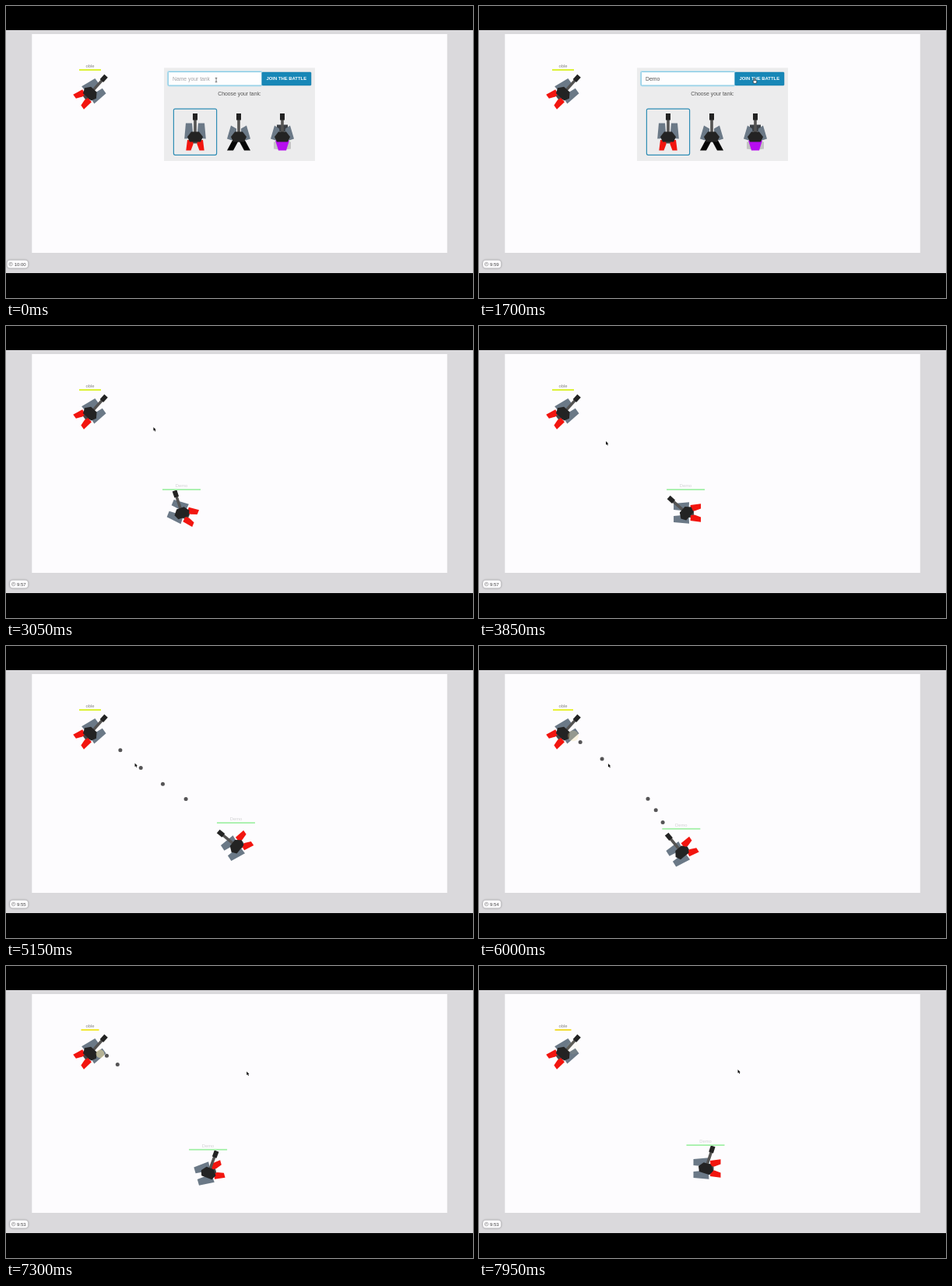
An HTML page with a canvas that plays this animation: 600 px wide and 375 px high, repeating every 8 s.

```html
<!DOCTYPE html>
<html lang="en">
<head>
<meta charset="utf-8">
<title>Tank battle</title>
<style>
html, body { margin: 0; width: 100%; height: 100%; overflow: hidden; background: #000; }
canvas { display: block; width: 600px; height: 375px; }
</style>
</head>
<body>
<canvas id="stage"></canvas>
<script>
const LOOP = 8000, SPAWN = 2000;
const canvas = document.getElementById('stage');
const ctx = canvas.getContext('2d');
const dpr = window.devicePixelRatio || 1;
canvas.width = 600 * dpr;
canvas.height = 375 * dpr;

const FONT = '"Liberation Sans", Arial, sans-serif';
const ARMOUR = '#6b7987', DARK = '#232323', HULL = '#454545';
const RIVAL_NAME = 'oble', PLAYER_NAME = 'Demo';
const RIVAL = { x: 108.5, y: 112, body: 54, gun: 42 };

// Waypoints, joined at steady speed
const ROUTE = [
  { t: 3060, x: 226, y: 240, body: -68 },
  { t: 3850, x: 266, y: 240, body: -90 },
  { t: 4800, x: 313, y: 248, body: -105 },
  { t: 5150, x: 296, y: 257, body: -124 },
  { t: 6700, x: 231, y: 271, body: -121 },
  { t: 7950, x: 291.5, y: 260, body: -90 }
];
// Pointer stops, each reached with an ease-out
const STOPS = [
  { t: 900, x: 270, y: 95 },
  { t: 1600, x: 354, y: 93.5 },
  { t: 2280, x: 354, y: 93.5 },
  { t: 3050, x: 190, y: 130 },
  { t: 3450, x: 116, y: 120 },
  { t: 3850, x: 163, y: 148 },
  { t: 6700, x: 166, y: 151 },
  { t: 7950, x: 332.5, y: 133 }
];
const BURSTS = [{ start: 3870, count: 4, gap: 235 }, { start: 5350, count: 3, gap: 215 }];
const SHOT_SPEED = 0.105, MUZZLE = 26, HIT_X = 124, BLAST = 420;

const clamp = (v) => Math.max(0, Math.min(1, v));
const rad = (deg) => deg * Math.PI / 180;
const linear = (k) => k;
const easeOut = (k) => 1 - (1 - k) ** 3;

function along(points, t, ease) {
  const next = points.findIndex((p) => t <= p.t);
  if (next < 1) return points.at(next);
  const a = points[next - 1], b = points[next];
  const k = ease((t - a.t) / (b.t - a.t));
  const mix = {};
  for (const key in a) mix[key] = a[key] + (b[key] - a[key]) * k;
  return mix;
}

const pointerAt = (t) => along(STOPS, t, easeOut);

// The gun always follows the pointer
function playerAt(t) {
  const p = along(ROUTE, t, linear), aim = pointerAt(t);
  const gun = Math.atan2(aim.x - p.x, p.y - aim.y) * 180 / Math.PI;
  return { ...p, gun };
}

function shoot(start) {
  const p = playerAt(start), a = rad(p.gun);
  const dx = Math.sin(a), dy = -Math.cos(a);
  const x = p.x + dx * MUZZLE, y = p.y + dy * MUZZLE;
  const len = (HIT_X - x) / dx;
  return { start, x, y, dx, dy, hit: start + len / SHOT_SPEED, hitY: y + dy * len };
}

const bullets = BURSTS.flatMap(({ start, count, gap }) =>
  Array.from({ length: count }, (_, i) => shoot(start + i * gap)));

function rect(x, y, w, h, fill) {
  ctx.fillStyle = fill;
  ctx.fillRect(x, y, w, h);
}

function poly(fill, ...points) {
  ctx.beginPath();
  for (let i = 0; i < points.length; i += 2) ctx.lineTo(points[i], points[i + 1]);
  ctx.closePath();
  ctx.fillStyle = fill;
  ctx.fill();
}

function mirrored(fill, ...points) {
  poly(fill, ...points);
  poly(fill, ...points.map((v, i) => i % 2 ? v : -v));
}

function box(x, y, w, h, r, fill, stroke, line) {
  ctx.beginPath();
  ctx.roundRect(x, y, w, h, r);
  if (fill) { ctx.fillStyle = fill; ctx.fill(); }
  if (stroke) { ctx.strokeStyle = stroke; ctx.lineWidth = line; ctx.stroke(); }
}

function dot(x, y, r, fill) {
  ctx.beginPath();
  ctx.arc(x, y, r, 0, 7);
  ctx.fillStyle = fill;
  ctx.fill();
}

function text(str, x, y, size, color, align = 'left', weight = '') {
  ctx.font = `${weight} ${size}px ${FONT}`;
  ctx.textAlign = align;
  ctx.fillStyle = color;
  ctx.fillText(str, x, y);
}

function placed(x, y, deg, paint) {
  ctx.save();
  ctx.translate(x, y);
  ctx.rotate(rad(deg));
  paint();
  ctx.restore();
}

// Hulls point up, with the turret pivot at the origin
function redHull() {
  rect(-6, 2, 12, 8, HULL);
  mirrored(ARMOUR, -12, -16, -4, -16, -3, -5, -6, 3.5, -13.8, 4);
  mirrored('#f2150f', -3, 6, -10, 5.5, -11.7, 19, -5.5, 19, -2.5, 11);
}

function blackHull() {
  rect(-5, 0, 10, 8, HULL);
  mirrored(ARMOUR, -10, -13, -3, -9, -3, 0, -9, 6, -15, 4);
  mirrored('#050505', 0, 6, -8, 6, -15, 19, -7, 19);
}

function purpleHull() {
  rect(-7, -14, 14, 9, '#3b3f44');
  mirrored(ARMOUR, -10, -13, -4, -9, -3, 0, -9, 6, -15, 4);
  mirrored('#c3c3c3', -5, 7, -11, 8, -11, 17, -4, 18);
  poly('#b70df0', -9, 6, 9, 6, 5, 19, -5, 19);
}

function turret() {
  rect(-1.8, -23, 3.6, 18, '#555453');
  poly(DARK, -10, 0, -5, -6.5, 5, -6.5, 10, 0, 7, 6.5, -7, 6.5);
  rect(-3, -30, 6, 8.5, DARK);
}

function tank(p, hull) {
  placed(p.x, p.y, p.body, hull);
  placed(p.x, p.y, p.gun, turret);
}

function label(p, name, color, width, bar) {
  text(name, p.x - 0.5, p.y - 33, 5.8, color, 'center');
  rect(p.x - 0.5 - width / 2, p.y - 30.8, width, 1.8, bar);
}

function joinPanel(t) {
  ctx.save();
  ctx.globalAlpha = 1 - clamp((t - 1760) / 380);
  rect(203, 79.5, 194, 119.5, '#ececed');
  box(207.7, 83.9, 121.4, 18.7, 1.5, null, '#c4e4f0', 1.6);
  box(208.3, 84.6, 120.3, 17.4, 1, '#fefeff', '#62b9dc', 0.8);
  box(329, 85, 63, 17, 1, '#1787b7', '#1579a4', 0.5);
  text('JOIN THE BATTLE', 360.3, 95.3, 5.9, '#fff', 'center', 'bold');

  const typed = PLAYER_NAME.slice(0, clamp((t - 50) / 400) * 4);
  if (typed) text(typed, 214, 96, 6.9, '#555');
  else text('Name your tank', 214, 96, 6.8, '#a2a2a5');

  text('Choose your tank:', 300, 114.7, 6.85, '#555', 'center');
  box(215.4, 132.1, 55.2, 59.2, 2, null, '#2f8db5', 1.2);
  [redHull, blackHull, purpleHull].forEach((hull, i) =>
    placed(243 + 56 * i, 168, 0, () => {
      placed(0, -1.5, 0, hull);
      turret();
    }));
  ctx.restore();
}

function clock(t) {
  const left = 600 - Math.floor(t / 1000);
  const str = Math.floor(left / 60) + ':' + String(left % 60).padStart(2, '0');
  const x = str.length > 4 ? 1.5 : 5;
  ctx.save();
  ctx.shadowColor = 'rgba(0, 0, 0, 0.45)';
  ctx.shadowBlur = 2.5 * dpr;
  box(x, 326.6, 28.3 - x, 9.8, 4, '#fcfbfd');
  ctx.restore();
  ctx.strokeStyle = '#808080';
  ctx.lineWidth = 0.6;
  ctx.beginPath();
  ctx.arc(x + 4.6, 331.5, 2.2, 0, 7);
  ctx.moveTo(x + 4.6, 330);
  ctx.lineTo(x + 4.6, 331.6);
  ctx.lineTo(x + 3.5, 331.6);
  ctx.stroke();
  text(str, 25.7, 333.6, 6, '#444', 'right');
}

function beam() {
  rect(-0.3, -2.8, 0.7, 5.6, '#444');
  rect(-1.3, -3, 2.6, 0.7, '#444');
  rect(-1.3, 2.4, 2.6, 0.7, '#444');
}

function hand() {
  box(-0.7, -0.8, 1.5, 4.5, 0.7, '#fff', '#222', 0.7);
  box(-1.8, 2, 4.6, 3.8, 1.2, '#fff', '#222', 0.7);
}

function arrow() {
  poly('#111', 0, 0, 0, 4.6, 1.1, 3.7, 2, 5.5, 2.8, 5.1, 2, 3.4, 3.3, 3.3);
}

function pointer(t) {
  const { x, y } = pointerAt(t);
  const overButton = x > 329;
  placed(x, y, 0, t > SPAWN ? arrow : overButton ? hand : beam);
}

function shot(b, t) {
  const age = t - b.start, fade = (t - b.hit) / BLAST;
  if (age >= 0 && fade < 0) {
    const d = age * SHOT_SPEED;
    dot(b.x + b.dx * d, b.y + b.dy * d, 2.5, '#555456');
  } else if (fade >= 0 && fade < 1) {
    dot(HIT_X - 3, b.hitY - 1, 4 + 5 * fade, `rgba(243, 227, 160, ${0.75 * (1 - fade)})`);
  }
}

function draw(t) {
  ctx.setTransform(dpr, 0, 0, dpr, 0, 0);
  rect(0, 0, 600, 375, '#000');
  rect(0, 31, 600, 312, '#dad9dc');
  rect(33.3, 36, 533.5, 281, '#fdfcfe');

  const hits = bullets.filter((b) => t >= b.hit).length;
  tank(RIVAL, redHull);
  label(RIVAL, RIVAL_NAME, '#858585', 28 - hits, `hsl(${67 - hits * 2}, 88%, 54%)`);

  if (t >= SPAWN) {
    const player = playerAt(t);
    tank(player, redHull);
    label(player, PLAYER_NAME, '#d2d2d4', 49, '#a4f0a8');
  }
  bullets.forEach((b) => shot(b, t));
  joinPanel(t);
  clock(t);
  pointer(t);
}

const begin = performance.now();
function tick() {
  draw((performance.now() - begin) % LOOP);
  requestAnimationFrame(tick);
}
tick();
</script>
</body>
</html>
```
